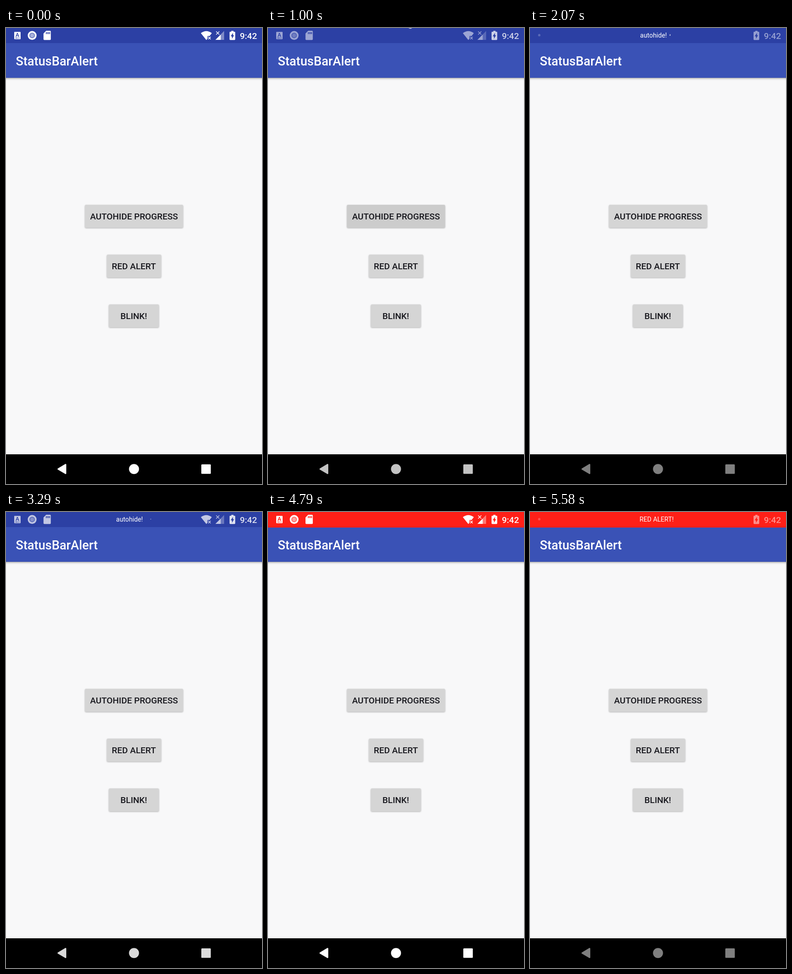
Animation, 561 px wide and 998 px high, one loop 8000 ms. Source, as an HTML page:

```html
<!DOCTYPE html>
<html lang="en">
<head>
<meta charset="utf-8">
<title>StatusBarAlert</title>
<style>
  html, body { margin: 0; width: 100%; height: 100%; overflow: hidden; background: #f8f8f9; }
  svg { display: block; }
  text { font-family: Roboto, sans-serif; font-weight: 500; font-size: 19.1px; fill: #fff; }
  .title { font-size: 27.3px; }
  .alert text { font-weight: 400; font-size: 14.2px; }
  .label { text-anchor: middle; fill: #17171d; }
  .face { fill: #d5d5d5; filter: drop-shadow(0 1.5px 1.5px rgba(0, 0, 0, .3)); }

  .bar, .icons, .dim, .dot, .alert, .press, .wave, .spin { animation: 8s linear infinite; }
  .bar { animation-name: bar; }
  .icons { animation-name: icons; }
  .dim { animation-name: dim; }
  .dot { animation-name: dot; }

  @keyframes bar {
    0%, 59.86% { fill: #2c40a4; height: 33px; }
    59.87%, 100% { fill: #ff2018; height: 34px; }
  }
  @keyframes icons {
    0%, 8.125%, 42.06%, 59.94% { opacity: 1; }
    17.5%, 38.875%, 69.31%, 100% { opacity: 0; }
  }
  @keyframes dim {
    0%, 8.125%, 42.06%, 59.94% { opacity: 1; }
    17.5%, 38.875%, 69.31%, 100% { opacity: .5; }
  }
  @keyframes dot {
    0%, 8.125%, 42.06%, 59.94% { opacity: 0; }
    17.5%, 38.875%, 69.31%, 100% { opacity: .22; }
  }

  /* Alerts slide in below the top edge */
  .alert { animation-timing-function: cubic-bezier(.37, 0, .63, 1); }
  .auto { animation-name: auto; }
  .red { animation-name: red; }
  @keyframes auto {
    0%, 10.9375%, 48.125%, 100% { transform: translateY(-33px); }
    14.6875%, 44.375% { transform: none; }
  }
  @keyframes red {
    0%, 62.75% { transform: translateY(-33px); }
    66.5%, 100% { transform: none; }
  }

  /* Progress ring */
  .spin, .arc { transform-origin: 312px 16px; }
  .spin { animation-name: spin; }
  .arc {
    fill: none; stroke: #fff; stroke-width: 1.4;
    animation: trim 1333.333ms -710ms cubic-bezier(.4, 0, .2, 1) infinite,
               shift 1333.333ms -710ms linear infinite;
  }
  @keyframes spin { from { transform: rotate(-156deg); } to { transform: rotate(1074deg); } }
  @keyframes shift { to { transform: rotate(90deg); } }
  @keyframes trim {
    0% { stroke-dasharray: 3 97; stroke-dashoffset: 0; }
    50% { stroke-dasharray: 75 25; stroke-dashoffset: 0; }
    100% { stroke-dasharray: 3 97; stroke-dashoffset: -75; }
  }

  /* Button ripples */
  .wave { transform-origin: 50% 50%; }
  .first .press { animation-name: press1; }
  .first .wave { animation-name: wave1; }
  .second .press { animation-name: press2; }
  .second .wave { animation-name: wave2; }
  @keyframes press1 {
    0%, 6.2%, 16%, 100% { opacity: 0; }
    7.8%, 12.5% { opacity: 1; }
  }
  @keyframes wave1 {
    0%, 6.2% { transform: scale(0); }
    11.5%, 100% { transform: scale(1); }
  }
  @keyframes press2 {
    0%, 59.9%, 69.4%, 100% { opacity: 0; }
    61.5%, 64.5% { opacity: 1; }
  }
  @keyframes wave2 {
    0%, 59.9% { transform: scale(0); }
    65%, 100% { transform: scale(1); }
  }
</style>
</head>
<body>
<svg width="561" height="998" viewBox="0 0 561 998">
  <defs>
    <linearGradient id="shade" x2="0" y2="1">
      <stop offset="0" stop-opacity=".32"/>
      <stop offset=".4" stop-opacity=".1"/>
      <stop offset="1" stop-opacity="0"/>
    </linearGradient>
  </defs>

  <rect width="561" height="998" fill="#f8f8f9"/>
  <rect y="109" width="561" height="6" fill="url(#shade)"/>
  <rect y="32" width="561" height="77" fill="#3a52b6"/>
  <text class="title" x="21.5" y="81.5">StatusBarAlert</text>
  <rect class="bar" width="561" height="33"/>

  <!-- Status icons -->
  <g class="icons" fill="#fff">
    <path fill-rule="evenodd" d="M19 8.5h12q1 0 1 1v14q0 1-1 1h-12q-1 0-1-1v-14q0-1 1-1z
      M24.1 11L20.8 19.5H22.4L23.1 17.6H26.7L27.4 19.5H29L25.7 11z M23.6 16.2L24.9 12.7L26.2 16.2z
      M20.5 21.3h5v1.2h-5z M26.5 21.3h1.3v1.2h-1.3z M28.7 21.3h1.3v1.2h-1.3z"/>
    <circle cx="57.3" cy="16.3" r="7.9" fill="none" stroke="#fff" stroke-width="3.6"/>
    <circle cx="57.3" cy="16.3" r="6.3" opacity=".35"/>
    <circle cx="57.3" cy="16.3" r="4" opacity=".4"/>
    <path fill-rule="evenodd" d="M88 6h8.4q1.8 0 1.8 1.8v16.6q0 1.8-1.8 1.8H84q-1.8 0-1.8-1.8V12z
      M87.5 9v4.2h2V9z M91 9v4.2h2V9z M94.4 9v4.2h2V9z"/>
    <path d="M427 11.2Q439 2.2 451 11.2L446.2 17.4H441.6V23.4L439 26.2z"/>
    <path d="M443.2 19.3l5.4 5.4m0-5.4l-5.4 5.4" stroke="#fff" stroke-width="1.6"/>
    <path d="M478 6.5V26H459z" opacity=".4"/>
    <path d="M470.5 14.4V26H459z"/>
    <path d="M460.5 7.5l7 7m0-7l-7 7" stroke="#fff" stroke-width="1.4"/>
  </g>
  <circle class="dot" cx="20.3" cy="15.7" r="2.6" fill="#fff"/>
  <g class="dim" fill="#fff">
    <path fill-rule="evenodd" d="M493.6 8.2V6.2h5v2h2.3q1.4 0 1.4 1.4v15.2q0 1.4-1.4 1.4H491.3
      q-1.4 0-1.4-1.4V9.6q0-1.4 1.4-1.4z M497.4 10.4L492.4 18.3H495.2V23.8L499.8 15.7H497.4z"/>
    <text x="512.4" y="23.8">9:42</text>
  </g>

  <!-- Alerts -->
  <g class="alert auto">
    <text x="241.3" y="21">autohide!</text>
    <g class="spin"><circle class="arc" cx="312" cy="16" r="5.2" pathLength="100"/></g>
  </g>
  <g class="alert red"><text x="240" y="21">RED ALERT!</text></g>

  <!-- Buttons -->
  <g class="first">
    <rect class="face" x="173" y="387" width="215" height="50" rx="2.5"/>
    <svg x="173" y="387" width="215" height="50">
      <g class="press" fill-opacity=".025">
        <rect width="215" height="50" rx="2.5"/>
        <circle class="wave" cx="107.5" cy="25" r="115"/>
      </g>
    </svg>
    <text class="label" x="280.5" y="419">AUTOHIDE PROGRESS</text>
  </g>
  <g class="second">
    <rect class="face" x="221" y="496" width="119" height="50" rx="2.5"/>
    <svg x="221" y="496" width="119" height="50">
      <g class="press" fill-opacity=".025">
        <rect width="119" height="50" rx="2.5"/>
        <circle class="wave" cx="59.5" cy="25" r="68"/>
      </g>
    </svg>
    <text class="label" x="280.2" y="528">RED ALERT</text>
  </g>
  <rect class="face" x="225.5" y="605" width="109.5" height="50" rx="2.5"/>
  <text class="label" x="280" y="637">BLINK!</text>

  <!-- Navigation bar -->
  <rect y="933" width="561" height="65"/>
  <g class="dim" fill="#fff">
    <path d="M114.4 965.2L130.6 955.6V974.8z" stroke="#fff" stroke-width="3" stroke-linejoin="round"/>
    <circle cx="280.5" cy="965.2" r="11"/>
    <rect x="428" y="955" width="20.8" height="20.8" rx="1.5"/>
  </g>
</svg>
</body>
</html>
```
